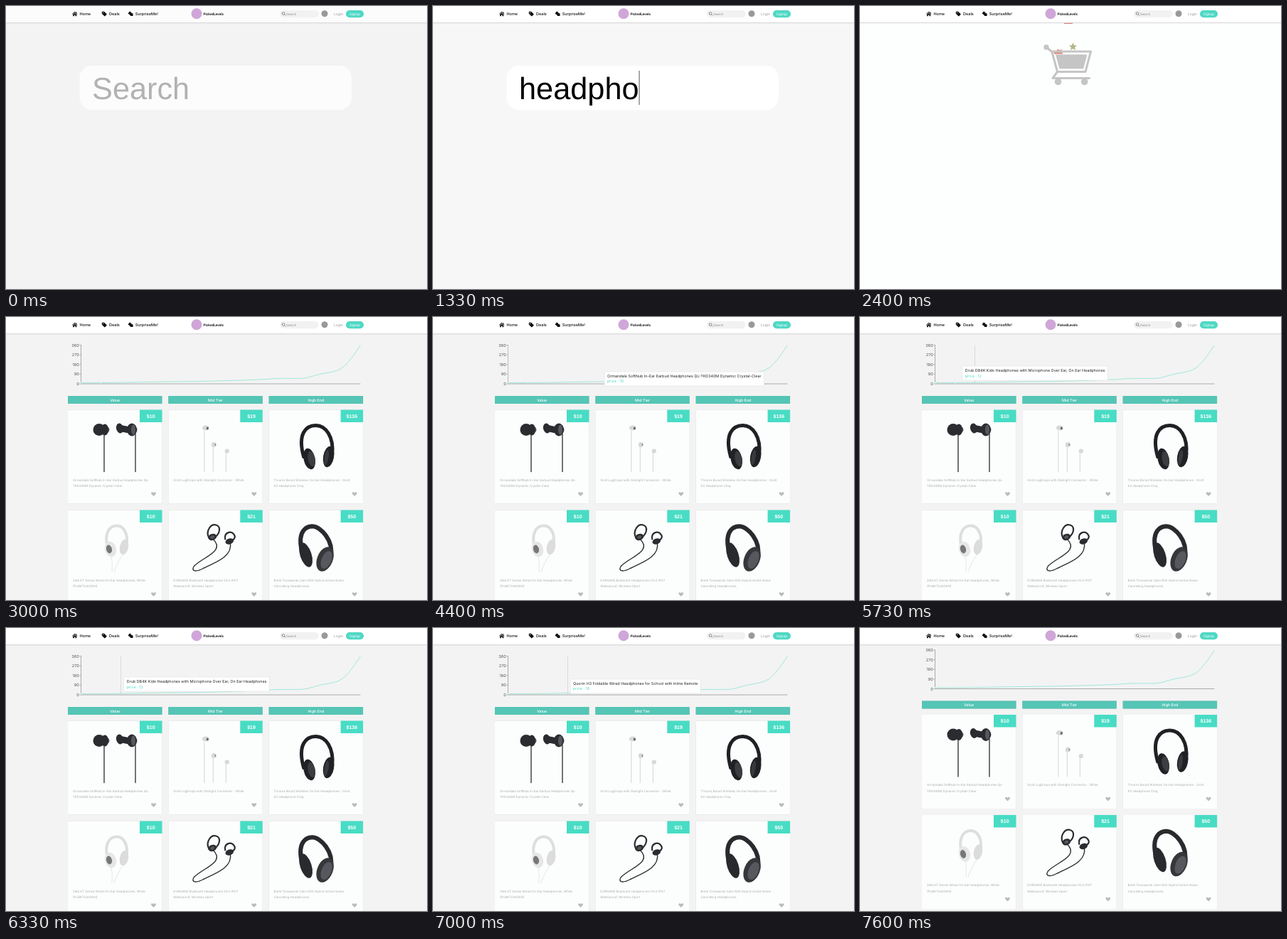
An HTML page for the animation above (8 s loop, 592 by 398 pixels).

```html
<!DOCTYPE html>
<html lang="en">
<head>
<meta charset="utf-8">
<title>Headphone search</title>
<style>
html, body { margin: 0; width: 100%; height: 100%; overflow: hidden; }
svg { display: block; width: 592px; height: 398px; font-family: Inter, sans-serif; text-rendering: geometricPrecision; }
.input { font: 43.3px "Liberation Sans", Arial, sans-serif; }
.nav { font-size: 5.5px; font-weight: 500; }
.line { fill: none; stroke-linecap: round; stroke-linejoin: round; }
.card { filter: drop-shadow(0 .6px .7px #0003); }
.price { font: bold 7px "Liberation Sans", Arial, sans-serif; fill: #fff; text-anchor: middle; }
.note { font-size: 4.4px; fill: #aaa; }
.tip { font-size: 5.4px; }
</style>
</head>
<body>
<svg xmlns="http://www.w3.org/2000/svg">
  <rect id="bg" width="592" height="398"/>
  <g id="search">
    <rect id="box" x="103.5" y="84" width="382.5" height="62" rx="17"/>
    <text id="query" class="input" x="121" y="130.5"></text>
    <rect id="caret" y="91" width="1" height="48" fill="#555"/>
  </g>
  <g id="loader">
    <g id="items"></g>
    <g class="line" stroke="#c5c5c5" stroke-width="3">
      <path d="M262 58L270 64.500L277.500 92.500H317L324.500 64H271M277.500 92.500L271 101.500H322.500"/>
      <path d="M276 69H318.500L313.500 87.500H281Z" fill="#c5c5c5" stroke-width="1.500"/>
    </g>
    <g fill="#c5c5c5"><circle cx="262" cy="58" r="3.700"/><circle cx="278.500" cy="106.500" r="4.800"/><circle cx="315.700" cy="106.500" r="4.800"/></g>
  </g>
  <g id="results"></g>
  <g id="header">
    <rect width="592" height="25" fill="#0000000a"/>
    <rect width="592" height="24" fill="#dcdcdc"/>
    <rect id="bar" width="592" height="23"/>
    <g fill="#111">
      <path d="M93 11.200L96.700 7.800L98.500 9.400V8.300H99.400V10.300L100.400 11.200L99.800 11.800L96.700 9.100L93.600 11.800ZM94.100 12L96.700 9.700L99.300 12V14.300H97.500V12.400H95.900V14.300H94.100Z"/>
      <path fill-rule="evenodd" d="M134.800 8.200Q134.800 7.700 135.300 7.700H138L141.600 11.200Q141.900 11.600 141.600 12L139.200 14.300Q138.800 14.600 138.400 14.300L134.800 10.800ZM136 9.300A.6.6 0 1 0 137.200 9.300A.6.6 0 1 0 136 9.300"/>
      <rect x="172.300" y="8.200" width="4" height="4" rx=".6" transform="rotate(42 174.300 10.200)"/>
      <rect x="174.800" y="10.300" width="3.800" height="3.800" rx=".6"/>
    </g>
    <g class="nav" fill="#111">
      <text x="103.500" y="13.200">Home</text><text x="145" y="13.200">Deals</text><text x="181.700" y="13.200">SurpriseMe!</text>
    </g>
    <circle cx="268" cy="10.700" r="7.500" fill="#cfa6d8"/>
    <text x="277.500" y="13" font-family="Roboto, sans-serif" font-size="4.800" font-weight="700" fill="#222">PickedLevels</text>
    <rect x="385" y="6" width="54.500" height="10.300" rx="5" fill="#f2f2f2"/>
    <path class="line" stroke="#777" stroke-width=".8" d="M391.600 12L393 13.400M388.200 10.500A1.900 1.900 0 1 0 392 10.500A1.900 1.900 0 1 0 388.200 10.500"/>
    <text x="394" y="12.900" font-size="4.300" fill="#888">Search</text>
    <circle cx="448" cy="10.700" r="4.500" fill="#999"/>
    <text x="461" y="12.800" font-size="4.900" fill="#999">Login</text>
    <rect x="478" y="6" width="25" height="10.300" rx="5.100" fill="#4fd8c4"/>
    <text x="490.500" y="12.900" font-size="4.700" fill="#fff" text-anchor="middle">Signup</text>
  </g>
</svg>
<script>
const $ = id => document.getElementById(id);
const show = (id, on) => $(id).setAttribute('visibility', on ? 'visible' : 'hidden');
const set = (id, attrs) => { for (const k in attrs) $(id).setAttribute(k, attrs[k]); };
const text = (x, y, s, extra = '') => `<text x="${x}" y="${y}" ${extra}>${s}</text>`;
const rect = (x, y, w, h, fill, extra = '') => `<rect x="${x}" y="${y}" width="${w}" height="${h}" fill="${fill}" ${extra}/>`;
const oval = (x, y, rx, ry, fill, turn = 0) =>
  `<ellipse cx="${x}" cy="${y}" rx="${rx}" ry="${ry}" fill="${fill}" transform="rotate(${turn} ${x} ${y})"/>`;
const line = (d, color, w) => `<path class="line" d="${d}" stroke="${color}" stroke-width="${w}"/>`;

// Price chart
const prices = [10, 10, 12, 16, 19, 21, 23, 28, 33, 40, 50, 50, 90, 136, 350];
const step = 28;
const px = i => 105.5 + step * i;
const py = v => 94 - v * 54.5 / 360;

function monotonePath(ys) {
  const slope = ys.slice(1).map((y, i) => y - ys[i]);
  const n = ys.length - 1;
  const tan = ys.map((_, i) => {
    const a = slope[i - 1], b = slope[i];
    return (Math.sign(a) + Math.sign(b)) * Math.min(Math.abs(a), Math.abs(b), Math.abs(a + b) / 4);
  });
  tan[0] = (3 * slope[0] - tan[1]) / 2;
  tan[n] = (3 * slope[n - 1] - tan[n - 1]) / 2;
  let d = `M${px(0)} ${ys[0]}`;
  for (let i = 0; i < n; i++)
    d += `C${px(i) + step / 3} ${ys[i] + tan[i] / 3} ${px(i + 1) - step / 3} ${ys[i + 1] - tan[i + 1] / 3} ${px(i + 1)} ${ys[i + 1]}`;
  return d;
}

function chart() {
  const ys = prices.map(py);
  let s = line('M105.5 39.500V94H498', '#999', .8);
  for (let v = 0; v <= 360; v += 90)
    s += line(`M103.500 ${py(v)}H105.500`, '#999', .6) + text(102.8, py(v) + 2.1, v, 'font-size="5.600" fill="#555" text-anchor="end"');
  s += line(monotonePath(ys), '#8fe3d3', .8);
  ys.forEach((y, i) => s += `<circle cx="${px(i)}" cy="${y}" r="1" fill="#fff" stroke="#8fe3d3" stroke-width=".5"/>`);
  return s;
}

// Product pictures, relative to the card corner
const dark = '#2b2c30', mid = '#55585e';
const pictures = [
  line('M51 34V87M95 34V87', dark, 1.3) + line('M46 28H54M86 28H93', mid, 9) +
    oval(44, 28, 8.5, 8.5, dark) + oval(52, 28, 5, 8, dark) + oval(73, 26, 5, 7, dark, -15) +
    line('M74 26L84 28', dark, 9) + oval(90, 28, 7, 9, dark) + oval(92, 28, 3, 7, mid),
  line('M50.500 30V87M63 50V87M81 59V87', '#d4d4d4', 1) + oval(52.5, 25.5, 5, 3.6, '#d8d8d8') + oval(55, 26, 1.5, 2, '#666') +
    oval(64, 49, 3.5, 3.5, '#d8d8d8') + oval(82.5, 58, 3.2, 3, '#d8d8d8') + oval(66, 49, .9, 1.5, '#888'),
  line('M49 66C40 34 52 22 66 22S92 38 89 64', '#202124', 5) + oval(57, 69, 8, 15, '#202124', -12) +
    oval(60, 69, 5, 11, '#3c3d40', -12) + oval(84, 66, 7.5, 15, '#202124', 10) + oval(81, 67, 3, 11, '#38393c', 10),
  line('M56 54C50 30 60 22 69 22S86 34 82 50', '#dedede', 4) + line('M61 65Q63 74 62 87M78 62Q70 72 65 87', '#e2e2e2', .9) +
    oval(79, 52, 6, 11, '#dcdcdc', 12) + oval(60, 55, 8, 11, '#e6e6e6', -15) + oval(58, 55, 4, 6, '#77777a', -15),
  line('M57 39C52 29 60 19 67 21S73 32 66 38M80 41C78 31 88 29 92 34S91 43 86 44', dark, 2.2) +
    line('M62 40C82 58 48 66 36 79C31 87 40 87 49 82C68 73 91 65 87 45', dark, 1.4) +
    oval(62, 38, 6, 4.5, dark, -20) + oval(62, 38, 3, 2, mid, -20) + oval(86, 44, 6, 4, dark, -20),
  line('M46 56C40 28 54 22 63 23S92 42 87 66', '#292a2d', 6) + oval(52, 63, 8, 18, '#292a2d', -18) +
    oval(79, 69, 11, 18, '#36373b', 22) + oval(81, 70, 7, 13, '#56585d', 22)
];
const products = [
  ['$10', 'Ormandale SoftNub In-Ear Earbud Headphones QL-', 'TKD340M Dynamic Crystal-Clear'],
  ['$19', 'Grolt LugDrops with Starlight Connector - White', ''],
  ['$136', 'Thrums Bora4 Wireless On-Ear Headphones - Grolt', 'K2 Headphone Chip,'],
  ['$10', 'Zelb KT Series Wired On-Ear Headphones, White', '(PLBKT240/WH)'],
  ['$21', 'DORVANE Bluetooth Headphones V5.0 IPX7', 'Waterproof, Wireless Sport'],
  ['$50', 'Brelk Tonewards Calm R30 Hybrid Active Noise', 'Cancelling Headphones,']
];
const colX = i => 87 + 141.3 * i;
const heart = '<path fill="#bbb" d="M120.500 121.500L117.500 118.400C116 116.500 118.500 114.700 120.500 116.800C122.500 114.700 125 116.500 123.500 118.400Z"/>';
const card = ([price, a, b], i) => `<g transform="translate(${colX(i % 3)} ${130.5 + 141 * Math.floor(i / 3)})">` +
  rect(0, 0, 132.5, 132, '#fcfdfd', 'class="card" rx="1"') + pictures[i] +
  rect(101, 0, 31.5, 17.5, '#48dcc4') + text(116.7, 11.2, price, 'class="price"') +
  text(7, 100, a, 'class="note"') + text(7, 108.5, b, 'class="note"') + heart + '</g>';

$('results').innerHTML = chart() +
  ['Value', 'Mid Tier', 'High End'].map((s, i) => rect(colX(i), 111, 132.5, 11, '#55c5b5', 'class="card"') +
    text(colX(i) + 66.2, 118.7, s, 'font-size="5.300" font-weight="500" fill="#fff" text-anchor="middle"')).join('') +
  products.map(card).join('') +
  `<path id="cursor" d="M0 39.500V94" stroke="#ccc" stroke-width=".6"/>
   <g id="tip" class="tip"><rect id="tipBox" height="20" fill="#fff" stroke="#ddd" stroke-width=".5"/>
   <text id="tipName" x="4" y="8" fill="#222"></text><text id="tipPrice" x="4" y="15.500" fill="#4fd8c4"></text></g>`;

// Hover stops: start time, point, tooltip top, label
const hovers = [
  [4400, 0, 74, 'Ormandale SoftNub In-Ear Earbud Headphones QL-TKD340M Dynamic Crystal-Clear'],
  [5022, 1, 69, 'Zelb KT Series Wired On-Ear Headphones, White (PLBKT240/WH)'],
  [5700, 2, 69, 'Drub DB4K Kids Headphones with Microphone Over Ear, On Ear Headphones'],
  [6720, 3, 72, 'Quorin H3 Foldable Wired Headphones for School with Inline Remote']
];
const tipX = i => px(i) + 4.3;
const mix = (a, b, p) => a + (b - a) * p;
const clamp = p => Math.max(0, Math.min(1, p));
const gray = v => `rgb(${v},${v},${v})`;

function drawTip(t) {
  const on = t >= 4400 && t < 7470;
  show('tip', on);
  show('cursor', on);
  if (!on) return;
  const k = hovers.findLastIndex(h => t >= h[0]);
  const [start, i, y, name] = hovers[k];
  const [x0, y0] = k ? [tipX(hovers[k - 1][1]), hovers[k - 1][2]] : [242, 77];
  const p = 1 - (1 - clamp((t - start) / 400)) ** 3;
  $('tipName').textContent = name;
  $('tipPrice').textContent = 'price : ' + prices[i];
  set('tipBox', { width: $('tipName').getComputedTextLength() + 8 });
  set('tip', { transform: `translate(${mix(x0, tipX(i), p)} ${mix(y0, y, p)})` });
  set('cursor', { transform: `translate(${px(i)} 0)` });
}

// Things dropping into the cart: x, start time, colour, shape
const star = 'M0-5.500L1.600-1.800L5.500-1.500L2.500 1.100L3.500 5L0 2.900L-3.500 5L-2.500 1.100L-5.500-1.500L-1.600-1.800Z';
const crown = 'M-6 4V-1L-3 0L-1-3L2-1L4-3L6 4Z';
const drops = [[279, 2101, '#dd8a70', crown], [299.5, 2120, '#b3b586', star], [293, 2260, '#da6a58', 'M-6-4H6V1.500H-6Z']];
function drawDrops(t) {
  $('items').innerHTML = drops.map(([x, start, color, d]) => {
    const u = (t - start + 420) % 420 / 350;
    return u > 1 ? '' : `<path fill="${color}" transform="translate(${x} ${12 + 70 * u * u})" d="${d}"/>`;
  }).join('');
}

const keys = [930, 970, 1000, 1060, 1100, 1130, 1330, 1470, 1600, 1730];
function drawSearch(t) {
  const typed = 'headphones'.slice(0, keys.filter(k => t >= k).length);
  const query = $('query');
  query.textContent = typed || 'Search';
  set('query', { fill: typed ? '#000' : '#b2b2b2' });
  set('caret', { x: 121 + (typed ? query.getComputedTextLength() : 0) });
  show('caret', t >= 270 && t < 2200);
}

function frame(now) {
  const t = now % 8000;
  const searching = t < 2200, loading = !searching && t < 2870, done = t >= 2870;
  const p = clamp(t / 1330);
  show('search', searching);
  show('loader', loading);
  show('results', done);
  set('bg', { fill: searching ? gray(mix(243, 247, p)) : loading ? '#fdfffe' : '#f3f3f3' });
  set('bar', { fill: gray(mix(252, 255, p)) });
  set('box', { fill: gray(mix(252, 255, p)) });
  drawSearch(t);
  if (loading) drawDrops(t);
  drawTip(t);
  set('results', { transform: `translate(0 ${t < 7470 ? 0 : t < 7600 ? -4 : -8.5})` });
  requestAnimationFrame(frame);
}
requestAnimationFrame(frame);
</script>
</body>
</html>
```
